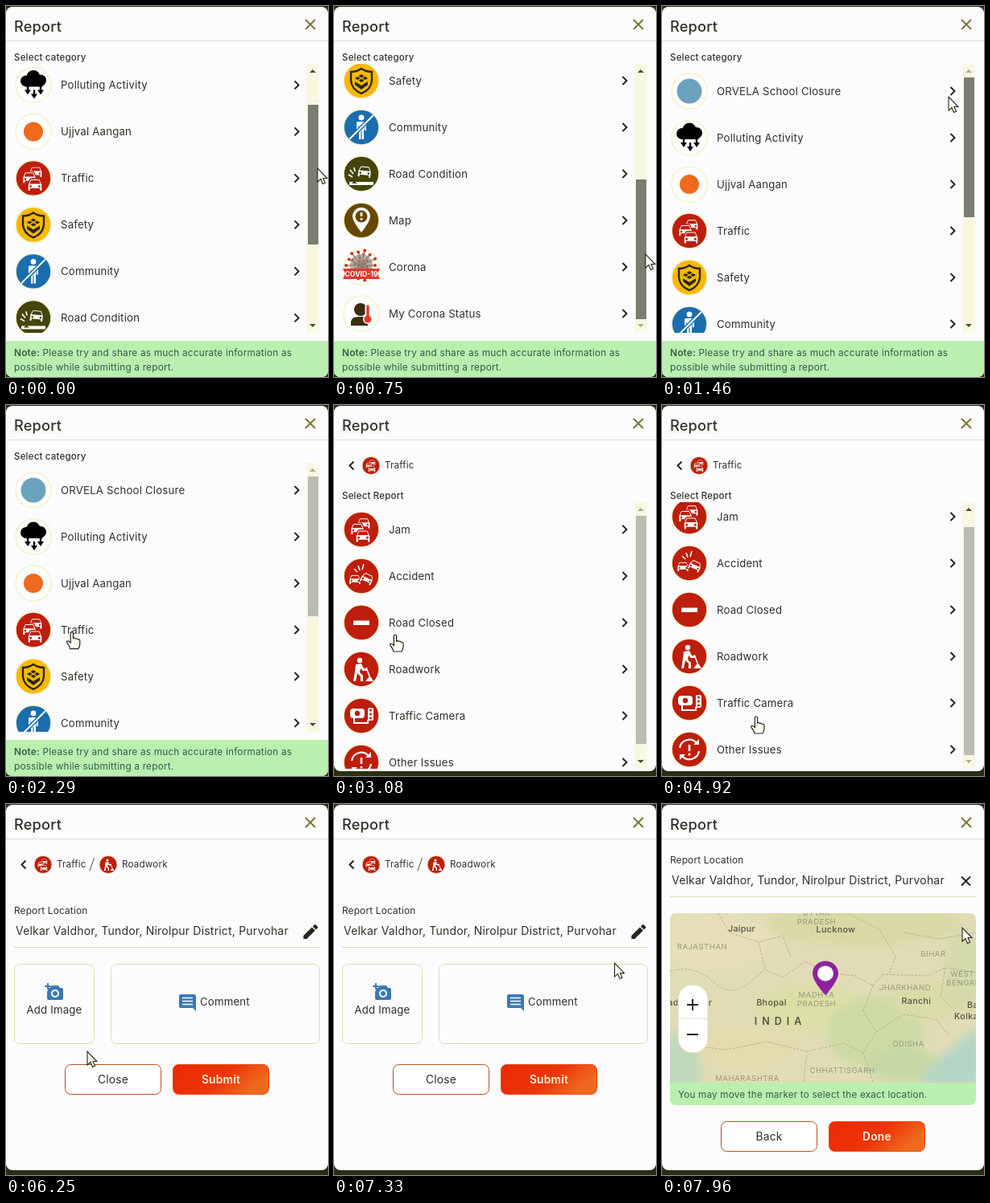
An HTML page that plays this animation: 400 by 462 pixels, repeating every 8 s.

```html
<!DOCTYPE html>
<html lang="en">
<head>
<meta charset="utf-8">
<title>Report dialog</title>
<style>
  html, body { margin: 0; width: 100%; height: 100%; overflow: hidden; background: #2c2e14; }
  svg { display: block; width: 100vw; height: 100vh; }
  text { font-family: Inter, "Open Sans", sans-serif; fill: #303026; }
</style>
</head>
<body>
<svg id="stage" viewBox="0 0 400 462"></svg>
<script>
const DURATION = 8000;
const INK = '#26261c', PAPER = '#fcfcff', RED = '#be1e0c', RING = '#f5f0cc';
const stage = document.getElementById('stage');

const text = (x, y, size, str, extra = '') =>
  `<text x="${x}" y="${y}" font-size="${size}" ${extra}>${str}</text>`;
const at = (x, y, body, scale = 1, turn = 0) =>
  `<g transform="translate(${x} ${y}) rotate(${turn}) scale(${scale})">${body}</g>`;
const path = (d, fill = 'none', stroke = 'none', width = 1, extra = '') =>
  `<path d="${d}" fill="${fill}" stroke="${stroke}" stroke-width="${width}" ${extra}/>`;
const rect = (x, y, w, h, fill, r = 0, extra = '') =>
  `<rect x="${x}" y="${y}" width="${w}" height="${h}" rx="${r}" fill="${fill}" ${extra}/>`;
const circle = (x, y, r, fill, extra = '') =>
  `<circle cx="${x}" cy="${y}" r="${r}" fill="${fill}" ${extra}/>`;

// ---- icons, centred on 0,0 ----
const badge = (fill, body) =>
  circle(0, 0, 22, fill, `stroke="${RING}" stroke-width="1.6"`) + body;

const car = (x, y, scale, back, turn = 0) => at(x, y,
  path('M-10 0L-7-7Q-6.5-8-5-8H5Q6.5-8 7-7L10 0V9H6V6H-6V9H-10Z', '#fff', back, 1.6) +
  path('M-7.5-1L-5.5-6H5.5L7.5-1Z', back) +
  circle(-6, 2.5, 1.6, back) + circle(6, 2.5, 1.6, back), scale, turn);

const person = fill => circle(0, -12, 3.4, fill) +
  path('M-5-7H5Q6-7 6-5V4H3.6V-2H3V15H.6V5H-.6V15H-3V-2H-3.6V4H-6V-5Q-6-7-5-7Z', fill);

const arrowDown = (x, y) => path(`M${x} ${y}v6`, 'none', '#000', 2.4) +
  path(`M${x - 4} ${y + 5}h8l-4 6z`, '#000');

const spikes = Array.from({ length: 14 }, (_, i) => {
  const a = i * Math.PI / 7, r = 17 + i % 2 * 2, inner = (i % 3 + 1) * 4;
  const x = Math.cos(a), y = Math.sin(a);
  return path(`M0 -2L${x * r} ${y * r - 2}`, 'none', '#8d7c6e', 1.4) +
    circle(x * r, y * r - 2, 2, '#c23a20') + circle(x * inner, y * inner - 4, 1.7, '#c64b32');
}).join('');

const icons = {
  school: badge('#fff', circle(0, 0, 15.5, '#6ba3bf')),
  pollution: badge('#fff',
    circle(-9, -5, 7, '#000') + circle(0, -10, 8.5, '#000') + circle(9, -6, 7, '#000') +
    rect(-12, -6, 25, 8, '#000', 4) + arrowDown(-7, 1) + arrowDown(1, 6) + arrowDown(9, 1)),
  clean: badge('#fff', circle(0, 0, 12, '#ef6a1c')),
  traffic: badge(RED, car(3, -8, .8, RED) + car(-5, -1, .84, RED) + car(2, 8, .9, RED)),
  safety: badge('#fab800',
    path('M0-15Q6-11 13-11V0Q12 11 0 16Q-12 11-13 0V-11Q-6-11 0-15Z', 'none', INK, 2.4) +
    path('M-8-3L0-8L8-3L0 2ZM-8 1L0 6L8 1V5L0 11L-8 5Z', INK) +
    path('M-5-6L5 0M5-6L-5 0', 'none', '#fab800', 1.4)),
  community: badge('#1a6eae', person('#fff') +
    path('M-15 15L15-15', 'none', '#1a6eae', 5) + path('M-15 15L15-15', 'none', '#fff', 2)),
  road: badge('#44440c', car(4, -3, .85, '#44440c', 6) +
    path('M-15 12H15', 'none', '#fff', 4) + path('M-9 9L-5 12H-12Z', '#44440c') +
    path('M-14-5L-10 0M-16 1L-11 4M-9-8L-8-3', 'none', '#fff', 1.7)),
  map: badge('#674600',
    path('M0 15Q-11 1-11-5A11 11 0 0 1 11-5Q11 1 0 15Z', '#fff') +
    circle(0, -5, 7.5, '#674600') + path('M0-10V-5', 'none', '#fff', 2.6) + circle(0, -1.7, 1.5, '#fff')),
  corona: badge('#fff', spikes + circle(0, -2, 14, '#918174', 'opacity=".65"') +
    path('M-23 2H23L20 8L23 15H-23L-20 8Z', '#e0382a') +
    text(0, 12, 8.6, 'COVID-19', 'text-anchor="middle" font-weight="700" style="fill:#fff"')),
  status: badge('#fff', circle(-1, -5, 8, '#3b2c12') +
    path('M-13 15V10Q-12 4-4 4H2Q7 4 8 9V15Z', '#3b2c12') +
    path('M8-9V6', 'none', '#fff', 7, 'stroke-linecap="round"') + circle(8, 7, 6, '#fff') +
    path('M8-9V6', 'none', '#e33a1c', 3.4, 'stroke-linecap="round"') + circle(8, 7, 4.5, '#e33a1c')),
  accident: badge(RED, car(-8, 4, .72, RED) + car(7, 3, .78, RED, 24) +
    path('M-2-7L-4-13M1-8L3-15M-5-5L-9-9', 'none', '#fff', 1.5)),
  closed: badge(RED, rect(-10, -2.5, 20, 5.5, '#fff')),
  roadwork: badge(RED, circle(-2, -11, 3.2, '#fff') +
    path('M-7-6L0-7L3-1L8 0V2H2L-1-1L-2 4L2 8V15H-1V9L-5 5L-7 15H-10L-8 3Z', '#fff') +
    path('M6-2L11 11', 'none', '#fff', 1.7) + path('M5 15L9 10H12L15 15Z', '#fff')),
  camera: badge(RED, rect(-14, -9, 18, 12, '#fff', 4) + circle(-5, -3, 3.2, RED) +
    path('M-9 3V9H8V5', 'none', '#fff', 2) + rect(8, -10, 7, 16, '#fff', 2) +
    [-7, -2, 3].map(y => circle(11.5, y, 1.5, RED)).join('')),
  other: badge(RED,
    path('M-12-2A12 12 0 0 1 9-8M12 2A12 12 0 0 1-9 8', 'none', '#fff', 2.2) +
    path('M5-6H12V-13ZM-5 6H-12V13Z', '#fff') +
    path('M0-6V2', 'none', '#fff', 2.6) + circle(0, 6, 1.6, '#fff')),
};

// ---- dialog parts ----
const label = (x, y, str, size = 13.2, extra = '') => text(x, y, size, str, `letter-spacing=".2" ${extra}`);
const heading = (y, str) => label(10, y, str, 11.5, 'font-weight="500"');
const centred = 'text-anchor="middle"';

const row = ([icon, title], y) => at(34, y, icons[icon]) + label(68, y + 4.6, title) +
  path(`M358.5 ${y - 5}l5 5l-5 5`, 'none', INK, 2);

const list = (id, rows, firstY, top, bottom) => `
  <clipPath id="${id}Clip">${rect(0, top, 373, bottom - top, '#000')}</clipPath>
  <g clip-path="url(#${id}Clip)"><g id="${id}Rows">
    ${rows.map((r, i) => row(r, firstY + i * 58)).join('')}</g></g>
  ${rect(373, top, 16, bottom - top, '#f8f7e2')}
  <path id="${id}Up" d="M377 ${top + 11}h8l-4-4z"/>
  <path id="${id}Down" d="M377 ${bottom - 11}h8l-4 4z"/>
  <rect id="${id}Thumb" x="375" width="13"/>`;

const header = height => rect(0, 1, 400, height, PAPER, 8) +
  text(10, 32, 18.2, 'Report', 'font-weight="500" letter-spacing=".2"') +
  path('M372 17l12 12m0-12l-12 12', 'none', '#7c7434', 2) +
  path('M0 43.5H400', 'none', '#dcdcd8');

const crumb = (x, icon, title) => at(x, 75.5, icons[icon], .5) + label(x + 17, 79, title, 11.6);
const backArrow = path('M24.5 70.5l-5 5l5 5', 'none', INK, 2);

const button = (x, y, title, primary) =>
  rect(x + .5, y + .5, 119, 37, primary ? 'url(#fire)' : '#fff', 7, `stroke="${primary ? '#e84a10' : '#b9501c'}"`) +
  label(x + 60, y + 24, title, 13.8, `${centred} ${primary ? 'font-weight="600" style="fill:#fff8e0"' : ''}`);

const locationField = (y, id) => label(10, y, 'Report Location', 11.8) +
  `<clipPath id="${id}">${rect(10, y, 350, 40, '#000')}</clipPath>` +
  `<g clip-path="url(#${id})">${label(12, y + 26, 'Velkar Valdhor, Tundor, Nirolpur District, Purvohar', 14)}</g>` +
  path(`M10 ${y + 41.5}H390`, 'none', '#d9dcae');

const categories = [
  ['school', 'ORVELA School Closure'], ['pollution', 'Polluting Activity'], ['clean', 'Ujjval Aangan'],
  ['traffic', 'Traffic'], ['safety', 'Safety'], ['community', 'Community'], ['road', 'Road Condition'],
  ['map', 'Map'], ['corona', 'Corona'], ['status', 'My Corona Status']];
const reports = [
  ['traffic', 'Jam'], ['accident', 'Accident'], ['closed', 'Road Closed'],
  ['roadwork', 'Roadwork'], ['camera', 'Traffic Camera'], ['other', 'Other Issues']];

const noteStyle = 'style="fill:#365c46"';
const categoryPage = header(461) + heading(68, 'Select category') + list('cat', categories, 106, 72, 407) +
  path('M0 417H400V454Q400 462 392 462H8Q0 462 0 454Z', '#b9f0b0') +
  label(10, 436, '<tspan font-weight="600">Note:</tspan> Please try and share as much accurate information as', 11.8, noteStyle) +
  label(10, 454, 'possible while submitting a report.', 11.8, noteStyle);

const reportPage = header(455) + backArrow + crumb(46, 'traffic', 'Traffic') +
  heading(117, 'Select Report') + list('rep', reports, 155, 121, 453);

const formPage = header(455) + backArrow + crumb(46, 'traffic', 'Traffic') +
  path('M104 83L109.5 67', 'none', '#55553a', 1) + crumb(127, 'roadwork', 'Roadwork') +
  locationField(137, 'formText') +
  path('M369.5 164V168H373.5L384 157.5L380 153.5ZM381 152.5L385 156.5L387 154.5Q388 153.5 387 152.5L385 150.5Q384 149.5 383 150.5Z', INK) +
  rect(10.5, 199.5, 99, 99, PAPER, 7, 'stroke="#dadfa6"') +
  rect(130.5, 199.5, 259, 99, PAPER, 7, 'stroke="#dadfa6"') +
  path('M52 229H55L57 226H65L67 229H69Q71 229 71 231V242Q71 244 69 244H53Q51 244 51 242V233H52Z', '#3c78b4') +
  circle(61, 236, 5, PAPER) + circle(61, 236, 3, '#3c78b4') +
  path('M52 223V231M48 227H56', 'none', '#3c78b4', 2) + label(60, 261, 'Add Image', 13.2, centred) +
  path('M217 237H234Q236 237 236 239V258L232 254H217Q215 254 215 252V239Q215 237 217 237Z', '#3c78b4') +
  path('M219 241.5H232M219 245.5H232M219 249.5H232', 'none', PAPER, 1.6) + label(241, 251, 'Comment') +
  button(73, 324, 'Close') + button(207, 324, 'Submit', true);

// ---- map ----
const state = (x, y, title) => text(x, y, 9.6, title, `${centred} letter-spacing=".5" style="fill:#99997e"`);
const city = (x, y, title) => text(x, y, 10.8, title, `${centred} font-weight="500" letter-spacing=".3" style="fill:#55553f"`);
const blob = (x, y, rx, ry, fill) => `<ellipse cx="${x}" cy="${y}" rx="${rx}" ry="${ry}" fill="${fill}"/>`;

const mapTiles = `<g filter="url(#soft)">
    ${blob(60, 170, 80, 35, '#e6dfba')}${blob(250, 150, 120, 26, '#d8d9a4')}${blob(185, 255, 70, 28, '#dcdfa6')}
    ${blob(265, 285, 60, 45, '#cddaa4')}${blob(330, 245, 45, 24, '#d9dca8')}${blob(95, 305, 70, 25, '#e4dcae')}
    ${blob(300, 325, 45, 22, '#c6d8a6')}${blob(20, 330, 28, 45, '#c0d9bb')}${blob(376, 205, 25, 50, '#d4d9ab')}
    ${path('M395 278Q370 292 358 306Q330 328 318 350H395Z', '#b3d5c4')}</g>` +
  path('M10 208Q40 200 62 220T104 226L128 206L150 216L178 196L205 210L240 214L262 226M70 136L84 160L120 172L150 164L160 190M262 226L274 212L330 214L352 204L390 210M262 226L250 258L266 284L250 310L262 346M266 284L300 262L340 268L356 288M30 300L80 306L130 296L180 308L226 298L250 310M230 136L270 156L290 190L282 212M300 160L345 168L390 160M352 204L346 240L368 262M180 308L176 346M128 206L120 172',
    'none', '#b5b394', 1, 'stroke-dasharray="3 1.5" stroke-linejoin="round"') +
  state(192, 139, 'UTTAR') + state(192, 150, 'PRADESH') + state(50, 181, 'RAJASTHAN') + state(337, 190, 'BIHAR') +
  state(373, 215, 'WEST') + state(374, 226, 'BENGAL') + state(302, 232, 'JHARKHAND') + state(192, 241, 'MADHYA') +
  state(192, 252, 'PRADESH') + state(306, 302, 'ODISHA') + state(224, 335, 'CHHATTISGARH') + state(106, 345, 'MAHARASHTRA') +
  city(99, 159, 'Jaipur') + city(216, 160, 'Lucknow') + city(136, 251, 'Bhopal') + city(316, 249, 'Ranchi') +
  city(378, 268, 'Kolka') + city(14, 251, 'ad') + city(60, 251, 'r') + city(386, 254, 'Ba') +
  text(147, 275, 12.5, 'INDIA', `${centred} font-weight="600" letter-spacing="6" style="fill:#55553f"`);

const mapPage = header(455) + locationField(74, 'mapText') + path('M372 90.5l11 11m0-11l-11 11', 'none', INK, 2) + `
  <clipPath id="mapClip">${rect(10, 136, 380, 239, '#000', 7)}</clipPath>
  <g clip-path="url(#mapClip)">${rect(10, 136, 380, 211, '#e1dcb6')}<g id="tiles">${mapTiles}</g>
    ${rect(10, 347, 380, 28, '#b9f0b0')}</g>` +
  label(20, 366, 'You may move the marker to select the exact location.', 11.7, noteStyle) +
  path('M203 238Q187 220 187 211A16 15.5 0 0 1 219 211Q219 220 203 238Z', '#8d219c') + blob(203, 211, 10, 9.5, '#fff') +
  rect(20, 225, 37, 85, '#fff', 18, 'stroke="#dcdcba"') + path('M20 267.5H57', 'none', '#e4e4d8') +
  path('M31 250H45M38 243V257M31 287H45', 'none', INK, 2) +
  button(73, 395, 'Back') + button(207, 395, 'Done', true);

stage.innerHTML = `<defs>
    <linearGradient id="fire" x1="0" y1="0" x2="1" y2=".35">
      <stop offset="0" stop-color="#ea2a04"/><stop offset=".6" stop-color="#ec3508"/><stop offset="1" stop-color="#ef6a20"/>
    </linearGradient>
    <filter id="soft"><feGaussianBlur stdDeviation="6"/></filter>
  </defs>
  ${rect(0, 0, 400, 462, '#2c2e14')}
  ${[categoryPage, reportPage, formPage, mapPage].map(p => `<g class="page">${p}</g>`).join('')}
  <g id="pointer">
    ${path('M0 0V17L4 13.5L6.5 19.5L9.5 18.2L7 12.5H12Z', '#fffef0', INK, 1.1, 'id="arrow"')}
    ${path('M-1.6 1Q0-1 1.6 1V8Q3 6.5 4.5 8.5Q6 7.5 7.5 9.5Q10 8.5 10 11.5V15Q10 18 8 21H-2Q-3 17-6 13.5Q-7 10.5-4 11.5L-1.6 13.5Z', '#fffef0', INK, 1.2, 'id="hand"')}
  </g>`;

// ---- timeline ----
const $ = id => document.getElementById(id);
const pages = [...document.querySelectorAll('.page')];
const pageStarts = [0, 2480, 6120, 7880];
const RELEASE = 1540;
const pointerKeys = [
  [0, 387, 202], [130, 387, 202], [720, 387, 309], [960, 387, 309], [1460, 356, 113], [1540, 352, 118],
  [1750, 290, 160], [2350, 76, 286], [4250, 76, 286], [4780, 117, 388], [5380, 117, 388], [5860, 101, 308],
  [6300, 101, 308], [6880, 270, 340], [7540, 373, 154], [8001, 373, 154]];

const clamp = (v, lo, hi) => Math.min(hi, Math.max(lo, v));
const ease = (t, from, to) => { const k = clamp((t - from) / (to - from), 0, 1); return k * k * (3 - 2 * k); };

function pointerAt(t) {
  const i = pointerKeys.findIndex(k => k[0] > t);
  const [t0, x0, y0] = pointerKeys[i - 1], [t1, x1, y1] = pointerKeys[i];
  const k = ease(t, t0, t1);
  return [x0 + (x1 - x0) * k, y0 + (y1 - y0) * k];
}

function setList(id, scroll, max, thumbY, thumbH, active) {
  $(id + 'Rows').setAttribute('transform', `translate(0 ${-scroll})`);
  const thumb = $(id + 'Thumb');
  thumb.setAttribute('y', thumbY);
  thumb.setAttribute('height', thumbH);
  thumb.setAttribute('fill', active ? '#7d7d6f' : '#bcbcb2');
  $(id + 'Up').setAttribute('fill', scroll < .5 ? '#aaaa98' : '#4c4c38');
  $(id + 'Down').setAttribute('fill', scroll > max - .5 ? '#aaaa98' : '#4c4c38');
}

function update(t) {
  const page = pageStarts.filter(s => s <= t).length - 1;
  pages.forEach((p, i) => p.style.display = i === page ? '' : 'none');

  // the pointer holds the thumb until it is released
  const [x, y] = pointerAt(t);
  const dragging = t < RELEASE;
  const drag = dragging ? clamp(y - 168, 0, 127) : 0;
  setList('cat', drag * 245 / 127, 245, 89 + drag, 174, dragging);

  const wheel = ease(t, 4550, 4900);
  setList('rep', 16 * wheel, 16, 138 + 14 * wheel, 284, false);
  $('repRows').setAttribute('opacity', ease(t, 2480, 2680));
  $('tiles').setAttribute('opacity', t < 7960 ? 0 : 1);

  const overSubmit = x > 207 && x < 327 && y > 324 && y < 362;
  const overPencil = x > 366 && y < 172;
  const hand = page < 2 ? !dragging : page === 2 && (overSubmit || overPencil);
  $('hand').style.display = hand ? '' : 'none';
  $('arrow').style.display = hand ? 'none' : '';
  $('pointer').setAttribute('transform', `translate(${x} ${y})`);
}

const start = performance.now();
function frame() {
  update((performance.now() - start) % DURATION);
  requestAnimationFrame(frame);
}
update(0);
requestAnimationFrame(frame);
</script>
</body>
</html>
```
